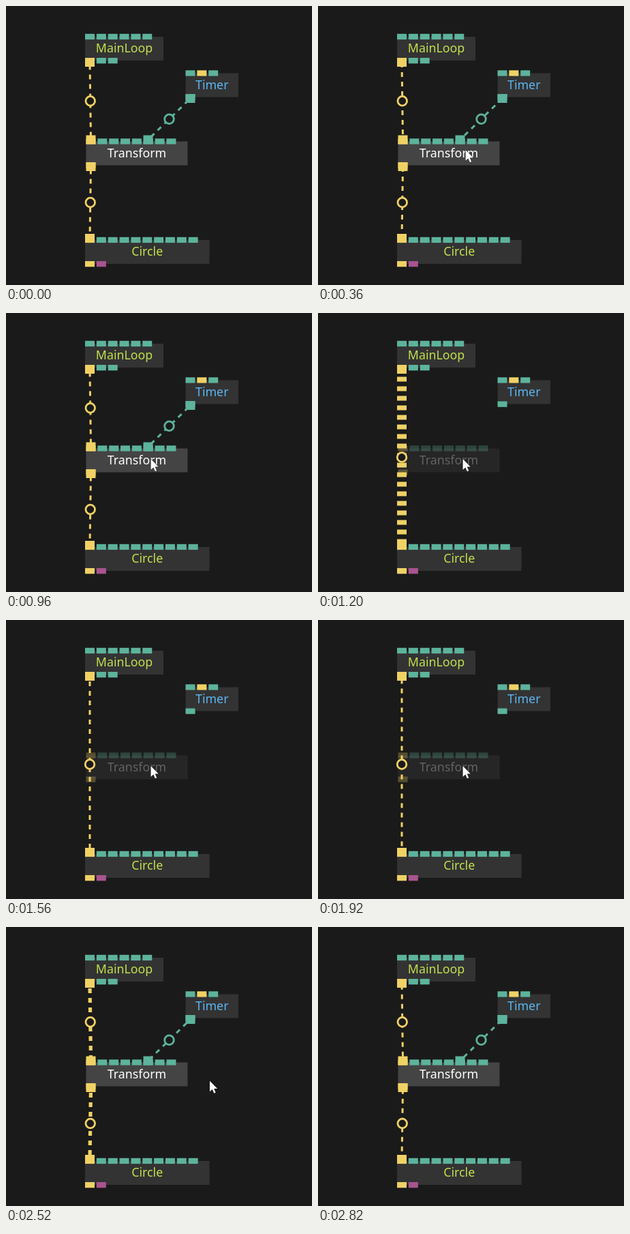
An HTML page with a canvas for the animation above (2.88 s loop, 449 px wide and 409 px high).

```html
<!DOCTYPE html>
<html>
<head>
<meta charset="utf-8">
<style>
html, body { margin: 0; width: 449px; height: 409px; overflow: hidden; background: #1a1a1a; }
canvas { display: block; }
</style>
</head>
<body>
<canvas id="stage" width="449" height="409"></canvas>
<script>
const ctx = document.getElementById('stage').getContext('2d');
const LOOP = 2880, STEP = 60, CUT = 1140, RELINK = 2220;
const BG = '#1a1a1a', YELLOW = '#f0d165', TEAL = '#5db39c', PURPLE = '#a9548f';
const GREEN = '#c1e04d', BLUE = '#5bb5f2';
const COLORS = { y: YELLOW, t: TEAL, p: PURPLE };

// One letter per port, top row and bottom row
const nodes = {
  main: { x: 116, y: 45, w: 115, label: 'MainLoop', color: GREEN, top: 'tttttt', bottom: 'ytt' },
  timer: { x: 263.5, y: 98.5, w: 77.5, label: 'Timer', color: BLUE, top: 'tyt', bottom: 't' },
  transform: { x: 117.5, y: 198.5, w: 149, label: 'Transform', color: '#fff', fill: '#444', top: 'yttttttt', bottom: 'y' },
  circle: { x: 116, y: 343, w: 182.5, label: 'Circle', color: GREEN, top: 'ytttttttt'+'t', bottom: 'yp' }
};

const lerp = (a, b, k) => a + (b - a) * k;
const progress = (t, from, to) => Math.min(1, Math.max(0, (t - from) / (to - from)));

function ports(kinds, x, y) {
  [...kinds].forEach((kind, i) => {
    ctx.fillStyle = COLORS[kind];
    ctx.fillRect(x + i * 16.85, y, 14, 8.3);
  });
}

function drawNode({ x, y, w, label, color, fill = '#333', top, bottom }, alpha = 1) {
  ctx.globalAlpha = alpha;
  ctx.fillStyle = fill;
  ctx.fillRect(x, y, w, 35);
  ports(top, x, y - 4.2);
  ports(bottom, x, y + 31);
  ctx.fillStyle = color;
  ctx.fillText(label, x + w / 2, y + 23);
  ctx.globalAlpha = 1;
}

function drawLink(x1, y1, x2, y2, color, t, width = 3, alpha = 1) {
  ctx.strokeStyle = ctx.fillStyle = color;
  ctx.lineWidth = width;
  ctx.globalAlpha = alpha;
  ctx.setLineDash([7, 7]);
  ctx.lineDashOffset = -(11 + (t - 1200) * 84 / LOOP);
  ctx.beginPath();
  ctx.moveTo(x1, y1);
  ctx.lineTo(x2, y2);
  ctx.stroke();
  ctx.globalAlpha = 1;
  ctx.setLineDash([]);
  ctx.fillRect(x1 - 7, y1 - 6.5, 14, 13);
  ctx.fillRect(x2 - 7, y2 - 6.5, 14, 13);

  ctx.beginPath();
  ctx.arc((x1 + x2) / 2, (y1 + y2) / 2, 6.8, 0, Math.PI * 2);
  ctx.fillStyle = BG;
  ctx.fill();
  ctx.lineWidth = 2.8;
  ctx.stroke();
}

// A fresh link is thick, then thins out
const linkWidth = (age, extra) => 3 + extra * (1 - progress(age, 0, 300));

function drawCursor(t) {
  if (t < 180 || t > 2640) return;
  let x, y;
  if (t < 360) {
    const k = 1 - (1 - progress(t, 180, 360)) ** 2;
    x = lerp(362, 216, k);
    y = lerp(236, 211, k);
  } else {
    const settle = progress(t, 360, 540), leave = progress(t, 2340, 2640) ** 2;
    x = lerp(lerp(216, 212, settle), 452, leave);
    y = lerp(lerp(211, 214, settle), 246, leave);
  }
  ctx.save();
  ctx.translate(x + 0.5, y);
  ctx.fillStyle = '#fff';
  ctx.strokeStyle = '#000';
  ctx.lineWidth = 1;
  ctx.stroke(arrow);
  ctx.fill(arrow);
  ctx.restore();
}
const arrow = new Path2D('M0 0V16L3.8 12.4L6.3 18.3L8.8 17.2L6.3 11.5H11.3Z');

function draw(now) {
  const t = Math.floor(now % LOOP / STEP) * STEP;
  const bypassed = t >= CUT && t < RELINK;
  const age = t < CUT ? Infinity : t - (bypassed ? CUT : RELINK);
  const dim = age < STEP;
  const width = dim ? 3 : linkWidth(age - STEP, 11);
  const alpha = dim ? 0.35 : 1;

  ctx.fillStyle = BG;
  ctx.fillRect(0, 0, 449, 409);
  ctx.font = '17.8px "Noto Sans", "Open Sans", sans-serif';
  ctx.textAlign = 'center';
  for (const node of Object.values(nodes))
    drawNode(node, bypassed && node === nodes.transform ? 0.28 : 1);

  if (bypassed) {
    drawLink(123, 82.5, 123, 340.5, YELLOW, t, width, alpha);
  } else {
    drawLink(123, 82.5, 124.5, 196, YELLOW, t, width, alpha);
    drawLink(124.5, 235.5, 123, 340.5, YELLOW, t, width, alpha);
    drawLink(270.5, 135.5, 208.5, 196, TEAL, t, linkWidth(age, 6));
  }
  drawCursor(t);
}

const start = performance.now();
function tick() {
  draw(performance.now() - start);
  requestAnimationFrame(tick);
}
tick();
</script>
</body>
</html>
```
